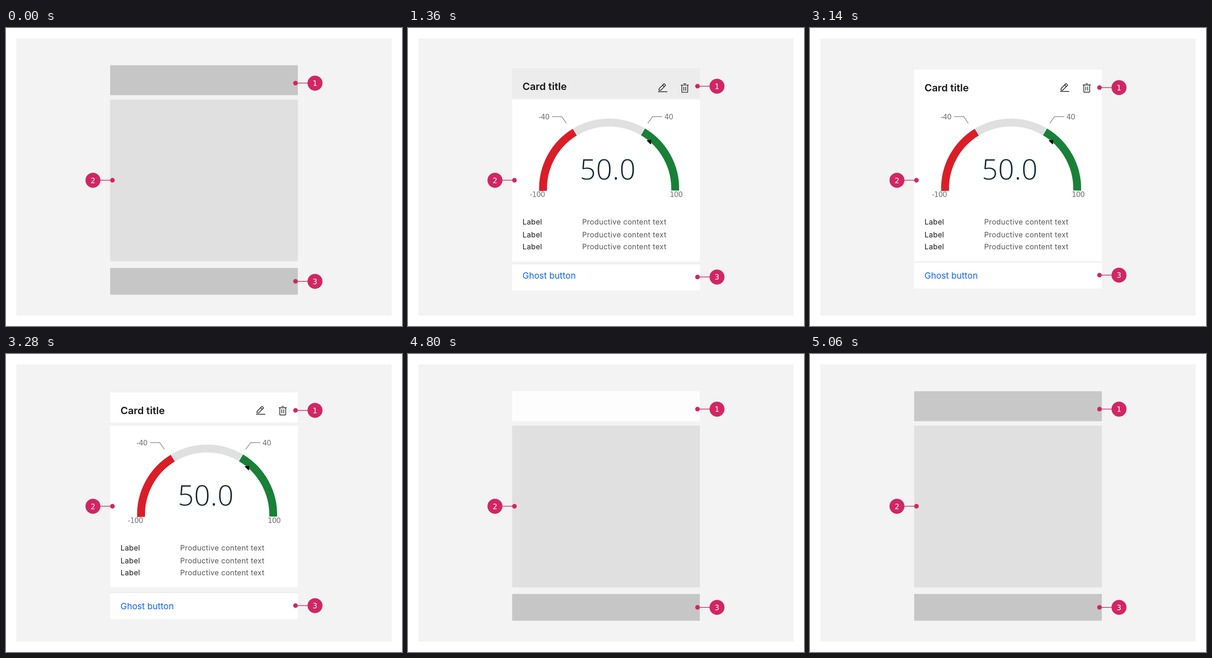
An HTML page with a canvas for the animation above (6460 ms loop, 863 by 649 pixels).

```html
<!DOCTYPE html>
<html lang="en">
<head>
<meta charset="utf-8">
<title>Card anatomy</title>
<style>
html, body { margin: 0; width: 100%; height: 100%; overflow: hidden; background: #fff; }
canvas { display: block; }
</style>
</head>
<body>
<canvas id="stage" width="863" height="649"></canvas>
<script>
const ctx = document.getElementById('stage').getContext('2d');
const LOOP = 6460, STEP = 20, MOVE = 360;
const SANS = 'Inter, "Open Sans", sans-serif';
const DIGITS = '"DejaVu Sans", sans-serif';
const PINK = '#d22663', INK = '#161616';

const EDIT = new Path2D('M2 26h28v2H2z M25.4 9c.8-.8.8-2 0-2.8l-3.6-3.6c-.8-.8-2-.8-2.8 0l-15 15V24h6.4z' +
  'M20.4 4L24 7.6l-3 3L17.4 7z M6 22v-3.6l10-10 3.6 3.6-10 10z');
const TRASH = new Path2D('M12 12h2v12h-2z M18 12h2v12h-2z M12 2h8v2h-8z' +
  'M4 6v2h2v20a2 2 0 0 0 2 2h16a2 2 0 0 0 2-2V8h2V6z M8 28V8h16v20z');

const mix = (a, b, p) => a + (b - a) * p;
const gray = v => { v = Math.round(v); return `rgb(${v},${v},${v})`; };

// cubic-bezier(.25, .1, .25, 1)
function ease(x) {
  if (x <= 0) return 0;
  if (x >= 1) return 1;
  const curve = (a, b, s) => 3 * a * s * (1 - s) ** 2 + 3 * b * s * s * (1 - s) + s ** 3;
  let lo = 0, hi = 1;
  for (let i = 0; i < 24; i++) {
    const mid = (lo + hi) / 2;
    if (curve(.25, .25, mid) < x) lo = mid; else hi = mid;
  }
  return curve(.1, 1, lo);
}

function rect(x, y, w, h, color) {
  ctx.fillStyle = color;
  ctx.fillRect(x, y, w, h);
}

function text(str, x, y, font, color, spacing = 0, align = 'left') {
  ctx.font = font;
  ctx.fillStyle = color;
  ctx.letterSpacing = spacing + 'px';
  ctx.textAlign = align;
  ctx.fillText(str, x, y);
}

function line(points, color, width) {
  ctx.beginPath();
  points.forEach(([x, y]) => ctx.lineTo(x, y));
  ctx.strokeStyle = color;
  ctx.lineWidth = width;
  ctx.stroke();
}

function disc(x, y, r) {
  ctx.beginPath();
  ctx.arc(x, y, r, 0, Math.PI * 2);
  ctx.fillStyle = PINK;
  ctx.fill();
}

function marker(n, x, dotX, y) {
  line([[x, y], [dotX, y]], PINK, 1.5);
  disc(dotX, y, 5);
  disc(x, y, 16.3);
  text(n, x, y + 6, '16px ' + DIGITS, '#fff', 0, 'center');
}

function icon(path, x, y) {
  ctx.save();
  ctx.translate(x, y);
  ctx.scale(.714, .714);
  ctx.fillStyle = INK;
  ctx.fill(path, 'evenodd');
  ctx.restore();
}

function arc(from, to, color) {
  const rad = Math.PI / 180;
  ctx.beginPath();
  ctx.arc(438.3, 349.8, 144, from * rad, to * rad);
  ctx.strokeStyle = color;
  ctx.lineWidth = 17.2;
  ctx.stroke();
}

function gauge() {
  arc(178, 238.7, '#da1e28');
  arc(239.2, 300.3, '#e0e0e0');
  arc(300.8, 361.7, '#198038');
  ctx.beginPath();
  ctx.moveTo(519.8, 244.8);
  ctx.lineTo(530.2, 243.4);
  ctx.lineTo(529.4, 254);
  ctx.fillStyle = '#000';
  ctx.fill();

  line([[314, 193], [335, 193], [345, 207.5]], '#8d8d8d', 1.4);
  line([[554, 193], [533, 193], [522.5, 207.5]], '#8d8d8d', 1.4);
  const tick = (s, x, y) => text(s, x, y, '15.5px ' + DIGITS, '#6f6f6f', -.6);
  tick('-40', 284.5, 199);
  tick('40', 559, 199);
  tick('-100', 265.5, 368);
  tick('100', 570.5, 368);
  text('50.0', 374.5, 330, '300 61px "Open Sans", "Noto Sans", sans-serif', '#152935', .8);
}

function content() {
  gauge();
  for (const y of [427.5, 456, 481.5]) {
    text('Label', 249.5, y, '16px ' + SANS, INK, .35);
    text('Productive content text', 379.5, y, '16px ' + SANS, '#565656', .35);
  }
}

function draw(t) {
  const filled = t >= 1240 && t < 4800;
  const close = filled ? ease((t - 1220) / MOVE) : 0;
  const open = filled ? ease((t - 3120) / MOVE) : 0;
  const joined = close - open;
  const headY = 81.1 + 10 * joined;
  const footY = 522.6 - 14 * joined;

  let shade = 198;
  if (filled) shade = mix(198, 255, close);
  else if (t >= 4800) shade = mix(255, 198, ease((t - 4780) / MOVE));

  rect(0, 0, 863, 649, '#fff');
  rect(22.6, 22.6, 817.8, 603.7, '#f3f3f3');
  rect(227, 156, 409, 352.3, filled ? '#fff' : '#e0e0e0');
  rect(227, headY, 409, 65.2, gray(shade));
  rect(227, footY, 409, 58.3, filled ? '#fff' : '#c6c6c6');

  if (filled) {
    rect(227, footY, 409, 1.1, '#e0e0e0');
    content();
    text('Card title', 249.5, headY + 47, '600 22px ' + SANS, INK);
    const iconY = 119.4 - 10 * open;
    icon(EDIT, 543.5, iconY);
    icon(TRASH, 591.7, iconY);
    text('Ghost button', 249.5, 545.5 + 14 * open, '19px ' + SANS, '#0f62fe');
  }

  marker('1', 673.4, 630.9, headY + 39);
  marker('2', 189.5, 232, 331.6);
  marker('3', 673.4, 630.9, footY + 29.1);
}

const start = performance.now();
function tick() {
  const t = (performance.now() - start) % LOOP;
  draw(Math.floor(t / STEP) * STEP);
  requestAnimationFrame(tick);
}
tick();
</script>
</body>
</html>
```
